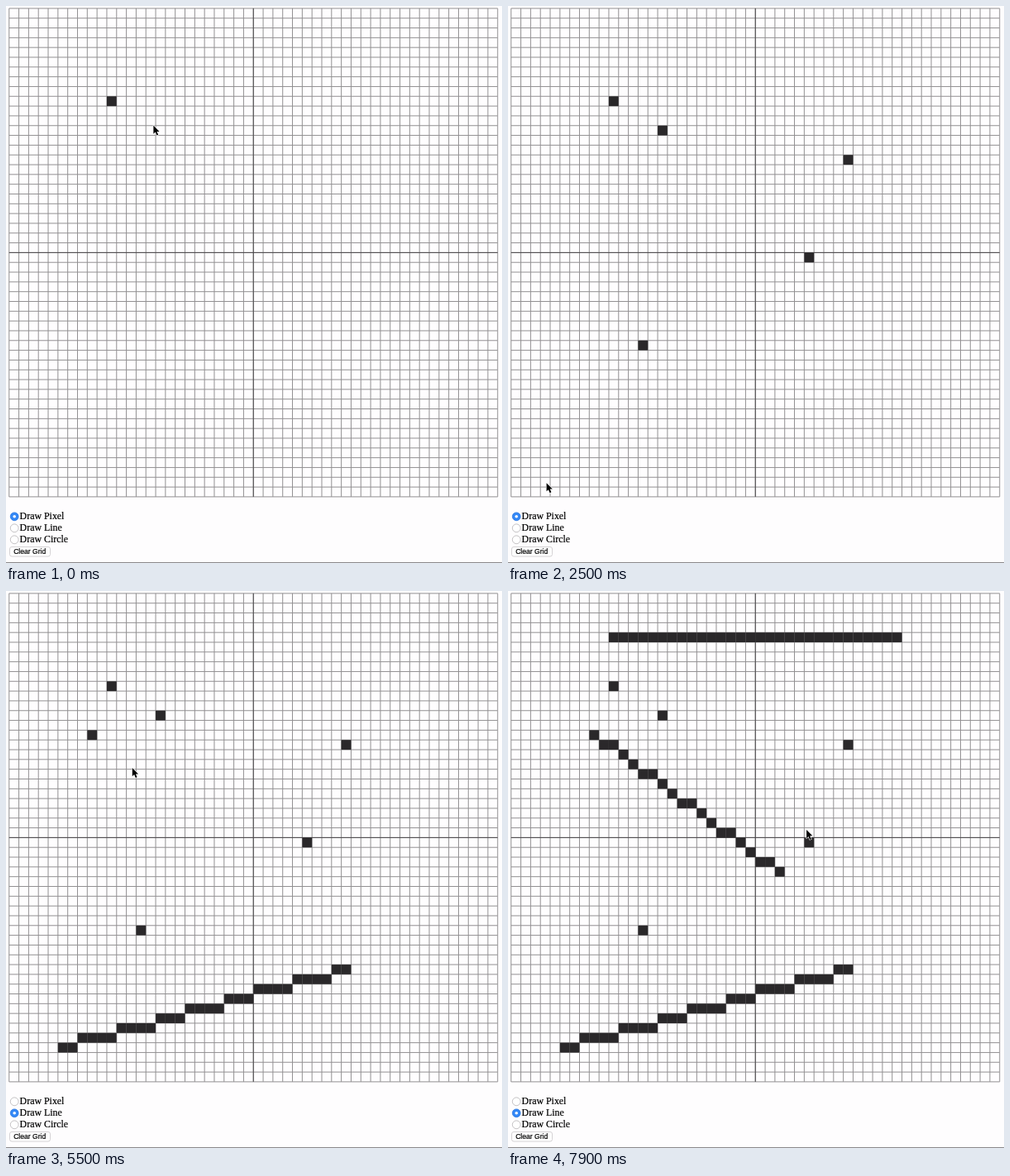
Write an HTML page that moves like this. It is 600 px wide and 674 px high and loops after 8 s.

```html
<!DOCTYPE html>
<html lang="en">
<head>
<meta charset="utf-8">
<title>Grid drawing</title>
<style>
html, body { margin: 0; width: 100%; height: 100%; overflow: hidden; background: #fefdfe; }
svg { display: block; width: 600px; height: 674px; }
text { stroke: #000; stroke-width: .2px; }
.label { font: 11.9px "Liberation Serif", "Times New Roman", serif; }
.button { font: 8.55px "Liberation Sans", Arial, sans-serif; }
</style>
</head>
<body>
<svg viewBox="0 0 600 674">
  <path id="grid" fill="none" stroke="#929092"/>
  <path id="axes" stroke="#4a484a"/>
  <g id="cells" fill="#2a282a"></g>
  <g id="radios"></g>
  <rect x="4.5" y="654.5" width="49" height="11.5" rx="2.5" fill="#fff" stroke="#c9c7c9" stroke-width=".8"/>
  <text class="button" x="9.2" y="663">Clear Grid</text>
  <path d="M0 673.5H600" stroke="#8a888a"/>
  <path id="cursor" d="M0 0V10.2L2.3 8.1L4 12L5.8 11.2L4.1 7.4H7.2Z" stroke="#fff" stroke-width="1.2" paint-order="stroke" stroke-linejoin="round"/>
</svg>
<script>
const LOOP = 8000, STEP = 100, COUNT = 50, SIZE = 11.82;
const byId = id => document.getElementById(id);
const toX = col => 3.75 + col * SIZE;
const toY = row => 2.9 + row * SIZE;

function add(parent, tag, attrs, text = '') {
  const el = document.createElementNS('http://www.w3.org/2000/svg', tag);
  for (const key in attrs) el.setAttribute(key, attrs[key]);
  el.textContent = text;
  return parent.appendChild(el);
}

// One vertical and one horizontal rule through grid position i.
const rules = i => `M${toX(i)} ${toY(0)}V${toY(COUNT)}M${toX(0)} ${toY(i)}H${toX(COUNT)}`;
byId('grid').setAttribute('d', Array.from({ length: COUNT + 1 }, (_, i) => rules(i)).join(''));
byId('axes').setAttribute('d', rules(COUNT / 2));

const radios = ['Draw Pixel', 'Draw Line', 'Draw Circle'].map((name, i) => {
  const y = 617.8 + i * 14, group = byId('radios');
  add(group, 'text', { class: 'label', x: 16.6, y: y + 3.4 }, name);
  const ring = add(group, 'circle', { cx: 10.2, cy: y, r: 4.9, 'stroke-width': .8 });
  const dot = add(group, 'circle', { cx: 10.2, cy: y, r: 1.8, fill: '#fff' });
  return { ring, dot };
});

const cells = [], moves = [];
let here = { col: 14.74, row: 11.98 }, lastClick;

function plot(time, col, row) {
  const el = add(byId('cells'), 'rect', { x: toX(col), y: toY(row), width: SIZE, height: SIZE });
  cells.push({ time, el });
}

// Moves the pointer in grid units; a higher pull starts faster and ends softer.
function go(leave, arrive, col, row, pull = 1.3) {
  moves.push({ leave, arrive, from: here, to: { col, row }, pull });
  here = { col, row };
}

function dot(time) {
  lastClick = { col: Math.floor(here.col), row: Math.floor(here.row) };
  plot(time, lastClick.col, lastClick.row);
}

// Joins the last clicked cell to the one under the pointer.
function line(time) {
  const { col, row } = lastClick;
  const dx = Math.floor(here.col) - col, dy = Math.floor(here.row) - row;
  for (let k = 1; k <= dx; k++) plot(time, col + k, row + Math.round(k * dy / dx));
}

plot(0, 10, 9);
go(0, 200, 15.2, 12.2);
dot(200);
go(200, 800, 34.3, 15.6);
dot(800);
go(900, 1300, 30.7, 25.4);
dot(1400);
go(1400, 1800, 13.55, 34.9);
dot(1800);
go(1900, 2800, .45, 52.9);

go(2900, 3500, 5.85, 46.5, .5);
dot(3700);
go(3700, 4200, 34.3, 38.6);
line(4600);
go(4500, 5200, 8.4, 14.8, .7);
dot(5300);
go(5400, 6100, 27.5, 28.8, 1.6);
line(6200);
go(6300, 6700, 11.5, 4.2, 3.2);
go(6800, 6900, 10.9, 4.5);
dot(6900);
go(6900, 7300, 39.4, 4.6);
line(7700);
go(7800, 7900, 30.2, 24.2);

function pointerAt(time) {
  const { leave, arrive, from, to, pull } = moves.findLast(m => m.leave <= time);
  const u = Math.min(1, (time - leave) / (arrive - leave));
  const e = 1 - (1 - u) ** pull;
  const mix = key => from[key] + (to[key] - from[key]) * e;
  return [toX(mix('col')) + .4, toY(mix('row'))];
}

function draw(now) {
  const time = Math.floor(now % LOOP / STEP) * STEP;
  for (const cell of cells) cell.el.style.display = time >= cell.time ? '' : 'none';
  const chosen = time < 2900 ? 0 : 1;
  radios.forEach(({ ring, dot }, i) => {
    const on = i === chosen;
    ring.setAttribute('fill', on ? '#3488f6' : '#fff');
    ring.setAttribute('stroke', on ? '#2877e2' : '#b5b3b5');
    dot.style.display = on ? '' : 'none';
  });
  byId('cursor').setAttribute('transform', `translate(${pointerAt(time)})`);
}

function tick() {
  draw(performance.now());
  requestAnimationFrame(tick);
}
tick();
</script>
</body>
</html>
```
